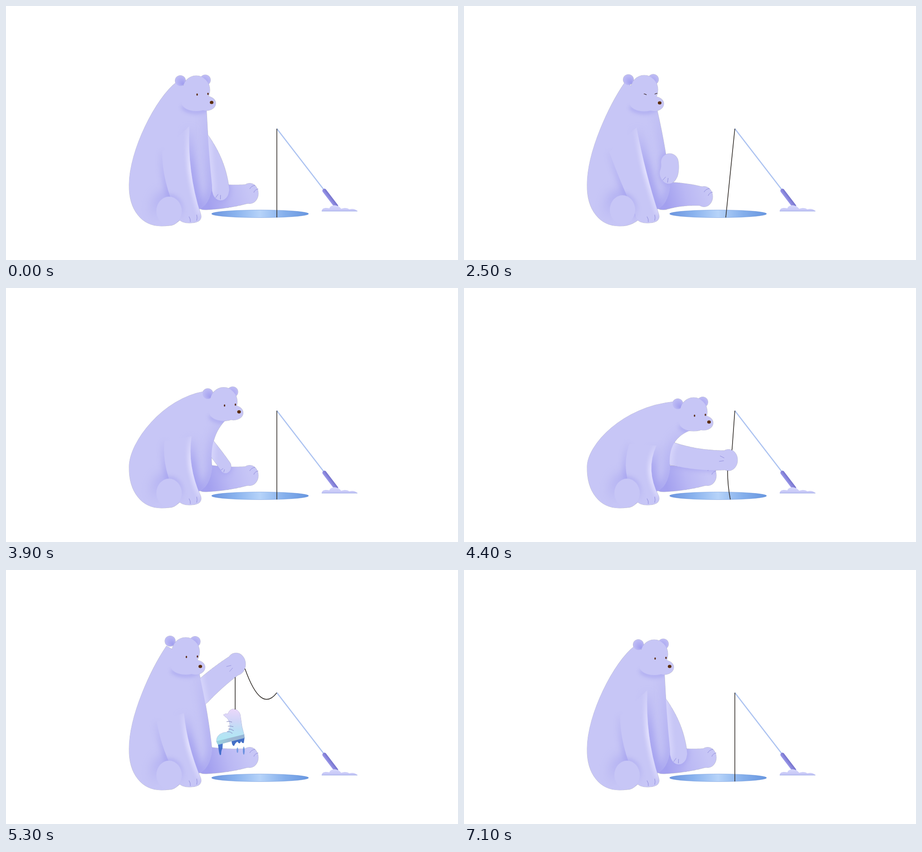
Write an HTML page with a canvas that moves like this. It is 998 by 561 pixels and loops after 7400 ms.

```html
<!DOCTYPE html>
<html lang="en">
<head>
<meta charset="utf-8">
<title>Ice fishing bear</title>
<style>
  html, body { margin: 0; width: 100%; height: 100%; overflow: hidden; background: #fff; }
  canvas { display: block; width: 998px; height: 561px; }
</style>
</head>
<body>
<canvas id="stage" width="998" height="561"></canvas>
<script>
const ctx = document.getElementById('stage').getContext('2d');
const LOOP = 7400, STEP = 100, TAU = Math.PI * 2;
const FUR = '#c7c6f6', SHADE = '#a3a0ef', CLAW = '#8f8cdc';
const shade = a => `rgba(163,160,239,${a})`;
const light = a => `rgba(229,227,255,${a})`;

// turn: profile to facing; lift: head raised; kick: far foot raised; grip: side of the hand with claws.
// shoulder: top of the near arm's inner edge; arm: start, bend, hand and the two radii of the far arm.
const sit = { nose: [454, 213], turn: 0, lift: 0.5, kick: 0, shoulder: [405, 265],
  arm: [432, 290, 470, 345, 474, 408, 14, 19], grip: 1.9 };
const startle = { nose: [432, 214], turn: 0, lift: 0.7, kick: 1, shoulder: [381, 268],
  arm: [454, 345, 456, 358, 452, 370, 19, 20], grip: 2 };
const lean = { nose: [508, 268], turn: 0, lift: 0, kick: 0, shoulder: [406, 322],
  arm: [443, 335, 455, 365, 460, 398, 10, 11], grip: 1.9 };
const reach = { nose: [541, 296], turn: 0, lift: 0, kick: 0, shoulder: [425, 348],
  arm: [446, 362, 515, 384, 584, 380, 25, 21], grip: 3.3 };
const hoist = { nose: [429, 213], turn: 0.1, lift: 1, kick: 0, shoulder: [393, 316],
  arm: [428, 274, 466, 236, 508, 208, 25, 22], grip: 2.6 };
const shrug = { nose: [394, 214], turn: 1, lift: 1, kick: 0, shoulder: [384, 298],
  arm: [428, 277, 475, 242, 520, 218, 24, 20], grip: 2.6 };

// The line sags from the rod tip to grip, loops over to drop and hangs down to end.
const TIP = [598, 271];
const slack = { grip: [598, 355], drop: [598, 405], end: [598, 467], sag: 0, loop: 0 };
const pulled = { grip: [592, 355], drop: [582, 405], end: [588, 467], sag: 0, loop: 0 };
const raised = { grip: [528, 219], drop: [506, 225], end: [506, 308], sag: 48, loop: 10 };
const draped = { grip: [526, 240], drop: [503, 245], end: [503, 320], sag: 46, loop: 39 };

const inOut = u => u * u * (3 - 2 * u);
const cubicIn = u => u ** 3;
const quadIn = u => u * u;

const POSES = [
  [0, sit], [2200, sit], [2500, startle], [2700, startle], [3200, lean, cubicIn],
  [3700, lean], [4400, reach], [4500, reach], [5200, hoist], [5500, hoist],
  [6000, shrug], [6400, shrug], [7100, sit], [LOOP, sit]
];
const LINES = [
  [0, slack], [4000, slack], [4400, pulled], [4500, pulled], [5200, raised],
  [5500, raised], [6000, draped], [6300, draped], [6700, slack, quadIn], [LOOP, slack]
];

function mix(a, b, u) {
  if (typeof a === 'number') return a + (b - a) * u;
  if (Array.isArray(a)) return a.map((v, i) => mix(v, b[i], u));
  return Object.fromEntries(Object.keys(a).map(k => [k, mix(a[k], b[k], u)]));
}

function sample(keys, t) {
  const i = keys.findIndex(k => k[0] > t);
  const [t0, a] = keys[i - 1], [t1, b, ease = inOut] = keys[i];
  return mix(a, b, ease((t - t0) / (t1 - t0)));
}

function addOval(path, x, y, rx, ry = rx) {
  path.moveTo(x + rx, y);
  path.ellipse(x, y, rx, ry, 0, 0, TAU);
  return path;
}

const oval = (...args) => addOval(new Path2D(), ...args);

// Round limb: circles along a bent path, ending in a slightly taller paw.
function limb([x0, y0, cx, cy, x1, y1, r0, r1]) {
  const path = oval(x1, y1, r1 * 0.95, r1 * 1.12);
  for (let u = 0; u <= 1; u += 1 / 48) {
    const v = 1 - u;
    addOval(path, v * v * x0 + 2 * u * v * cx + u * u * x1,
      v * v * y0 + 2 * u * v * cy + u * u * y1, mix(r0, r1, u));
  }
  return path;
}

function fill(path, style) {
  ctx.fillStyle = style;
  ctx.fill(path);
}

function stroke(path, style, width) {
  ctx.strokeStyle = style;
  ctx.lineWidth = width;
  ctx.stroke(path);
}

function ramp(x0, y0, x1, y1, ...stops) {
  const g = ctx.createLinearGradient(x0, y0, x1, y1);
  stops.forEach((c, i) => g.addColorStop(i / (stops.length - 1), c));
  return g;
}

// Blurred stroke kept inside a shape.
function soft(inside, path, style, width, blur) {
  ctx.save();
  ctx.clip(inside);
  ctx.filter = `blur(${blur}px)`;
  stroke(path, style, width);
  ctx.restore();
}

const HOLE = oval(561, 459, 107, 8.5);
const ABOVE_WATER = new Path2D();
ABOVE_WATER.rect(0, 0, 998, 459);
ABOVE_WATER.addPath(HOLE);

function drawScene() {
  fill(HOLE, ramp(454, 0, 668, 0, '#6c95df', '#8ab3ee', '#b6d3f9', '#86b0ec', '#6796e0'));
  stroke(HOLE, 'rgba(70,120,205,.55)', 0.8);
  const rod = new Path2D('M598 271L702 406');
  stroke(rod, '#93b1ec', 2.2);
  stroke(rod, '#cbd9f9', 0.9);
  ctx.lineCap = 'round';
  stroke(new Path2D('M703 408L729 442'), ramp(699, 411, 707, 405, '#9d9bec', '#7471cb'), 9);
  ctx.lineCap = 'butt';
  fill(new Path2D('M697 453C698 446 705 445 714 447C717 438 733 438 740 448C748 445 754 446 758 449C766 447 772 449 776 453Z'),
    ramp(0, 441, 0, 453, '#d6d7fb', '#c3c4f5'));
  stroke(new Path2D('M697 453H776'), '#93a3e3', 1);
}

function drawLine({ grip, drop, end, sag, loop }, tug) {
  const path = new Path2D();
  const sway = ([x, y], dx = 0, dy = 0) => [x + dx + tug * (y - TIP[1]) / 196, y + dy];
  const hang = u => sway(mix(TIP, grip, u), 0, sag);
  const over = u => sway(mix(grip, drop, u), 0, -loop);
  path.moveTo(...TIP);
  path.bezierCurveTo(...hang(1 / 3), ...hang(2 / 3), ...sway(grip));
  path.bezierCurveTo(...over(0.5), ...over(0.9), ...sway(drop));
  path.quadraticCurveTo(...sway([drop[0], (drop[1] + end[1]) / 2]), ...sway(end));
  stroke(path, '#35302c', 1.6);
}

function drawDrips(t) {
  const k = Math.max(0, Math.min(1, (6000 - t) / 600));
  if (!k) return;
  ctx.globalAlpha = 0.9;
  fill(new Path2D(`M-39 70L-27 67L-28 ${70 + 16 * k}Q-31 ${72 + 18 * k} -31 ${72 + 27 * k}Q-34 ${75 + 30 * k} -36 ${72 + 20 * k}Z`), '#3767c8');
  fill(new Path2D(`M-8 69L21 61L19 ${66 + 8 * k}Q15 ${66 + 9 * k} 13 ${66 + 4 * k}Q10 ${66 + 13 * k} 5 ${66 + 5 * k}Q0 ${66 + 8 * k} -2 ${68 + 12 * k}Q-7 ${70 + 12 * k} -8 69Z`), '#2f5fc0');
  const fall = ((t + 100) % 300) / 5;
  ctx.globalAlpha = 0.75 * k;
  fill(oval(5, 90 + fall, 1.8, 6), '#5d8fe0');
  fill(oval(19, 91 + fall, 2, 9), '#4c80d8');
  ctx.globalAlpha = 1;
}

function drawBoot([x, y], t) {
  ctx.save();
  ctx.clip(ABOVE_WATER);
  ctx.translate(x, y);
  drawDrips(t);
  const boot = new Path2D('M-26 12Q-21 8 -16 10Q-13 0 -4 -1Q7 0 11 11L15 38L20 57L-41 72Q-42 61 -34 55Q-26 50 -18 50Q-10 46 -12 32Q-14 20 -22 16Z');
  stroke(boot, 'rgba(110,110,170,.6)', 1);
  fill(boot, ramp(0, 0, 0, 68, '#ead8fa', '#d3d5f8', '#bbdff5', '#b0e8f3'));
  fill(new Path2D('M-41 70L20 55L21 63L-37 78Q-41 76 -41 70Z'), ramp(-41, 0, 21, 0, '#98d3e2', '#9fb9d3', '#94b4d6'));
  stroke(new Path2D('M-19 27Q-13 25 -7 28M-16 37Q-10 36 -4 38M-15 43Q-9 43 -3 47M-18 49Q-11 48 -6 53'), '#7f82bd', 1);
  ctx.restore();
}

function drawSplash(t) {
  if (t < 6600 || t > 7000) return;
  const u = (t - 6500) / 600;
  ctx.globalAlpha = 1 - u * 0.8;
  stroke(oval(598, 461, 15 + 34 * u, 3 + 6 * u), '#a9cbf8', 1.4);
  for (let i = 0; i < 8; i++) {
    const rise = (22 + 13 * (i % 3)) * Math.sin(Math.PI * u);
    fill(oval(598 + (i - 3.5) * (4 + 10 * u), 461 - rise, 2, 3.4), '#7eabec');
  }
  ctx.globalAlpha = 1;
}

// Torso from the hip up the curved back to the nape, then down throat and belly.
function torsoShape({ nose: [x, y], turn }) {
  const nape = [x - 77 + 23 * turn, y - 45];
  const bend = nape[0] - 272;
  const throat = [x - 5 - 0.27 * Math.max(0, x - 430) + 27 * turn, y + 16];
  const belly = [447, 320 + 0.12 * (throat[1] - 229)];
  const body = new Path2D('M455 398Q450 440 425 449L395 462Q375 486 345 486C300 487 271 450 272 395');
  body.bezierCurveTo(272, 395 - (395 - nape[1]) / 3,
    nape[0] - (0.25 + 0.0018 * bend) * bend, nape[1] + 5400 / bend - 17, ...nape);
  body.lineTo(x - 30, y - 20);
  body.lineTo(...throat);
  body.quadraticCurveTo(...belly, 455, 398);
  const rim = new Path2D('M425 449Q450 440 455 398');
  rim.quadraticCurveTo(...belly, ...throat);
  return { body, rim, top: throat[1] };
}

function nearArm([x, y]) {
  const ox = x - 60, oy = 250 + 0.27 * y;
  const outerEdge = `Q344 ${oy + 65} 379 462`, innerEdge = `Q400 ${262 + 0.4 * y} ${x} ${y}`;
  return {
    shape: new Path2D(`M${ox} ${oy}${outerEdge}C380 478 398 480 410 479C428 478 433 470 430 460${innerEdge}Z`),
    outer: new Path2D(`M${ox} ${oy}${outerEdge}`),
    inner: new Path2D(`M430 460${innerEdge}`),
    oy
  };
}

function headShape({ nose: [x, y], turn, lift }) {
  const jaw = [x - 34 + 20 * turn, y + 1, 32 + 4 * turn, 19 - 2 * lift];
  const outline = oval(x - 34 + 18 * turn, y - 22 - 10 * lift, 30 + 5 * turn, 32);
  addOval(outline, ...jaw);
  addOval(outline, x - 12 + 14 * turn, y + 2, 21, 16);
  const ears = [
    [x - 69 + 24 * turn, y - 40 - 16 * lift],
    [x - 14 + 25 * turn, y - 44 - 11 * lift]
  ];
  const eyes = [
    [x - 32 + 13 * turn, y - 14 - 7 * lift],
    [x - 8 + 17 * turn, y - 16 - 6 * lift]
  ];
  return { outline, jaw, ears, eyes };
}

function drawHead(head, nose, torso, shut) {
  const [jx, jy, jrx, jry] = head.jaw;
  const chin = new Path2D();
  chin.ellipse(jx, jy + 2, jrx, jry, 0, 0.15 * Math.PI, 0.9 * Math.PI);
  soft(torso, chin, shade(0.8), 7, 4);
  head.ears.forEach(([x, y], i) => {
    const g = ctx.createRadialGradient(x + (i ? -5 : 6), y + 7, 1, x, y, 14);
    g.addColorStop(0, SHADE);
    g.addColorStop(1, '#c3c1f6');
    fill(oval(x, y, 11.5), g);
  });
  fill(head.outline, FUR);
  head.eyes.forEach(([x, y], i) => {
    const tilt = i ? -1 : 1;
    if (shut) stroke(new Path2D(`M${x - 3} ${y - tilt}Q${x} ${y - 1} ${x + 3} ${y + tilt}`), '#3c2a2a', 1.3);
    else fill(oval(x, y, 1.6, 2.5), '#5a2b12');
  });
  fill(oval(...nose, 4, 3.6), '#5b2c06');
}

function drawClaws({ arm, grip, turn }) {
  const [x, y, , r] = arm.slice(4);
  const path = new Path2D();
  for (const a of [grip - 0.3, grip + 0.3]) {
    path.moveTo(x + r * Math.cos(a), y + r * Math.sin(a));
    path.lineTo(x + r * 0.5 * Math.cos(a), y + r * 0.5 * Math.sin(a));
  }
  ctx.globalAlpha = 1 - turn;
  stroke(path, CLAW, 1);
  ctx.globalAlpha = 1;
}

function drawBear(p, t, line) {
  const { body, rim, top } = torsoShape(p);
  const near = nearArm(p.shoulder), head = headShape(p);
  const k = p.kick;
  const leg = limb([440, 420, 490 - 8 * k, 423 - 10 * k, 538 - 8 * k, 414 + 7 * k, 30, 20]);
  const arm = limb(p.arm);
  const haunch = oval(360 - 10 * k, 453 - 3 * k, 28, 32);

  const armFront = t >= 2300 && t < 3000;
  const armBehind = t >= 3000 && t < 3900;
  const ropeOver = t >= 6000 && t < 6700;
  const paintArm = () => {
    fill(arm, FUR);
    if (!armFront) soft(arm, rim, light(0.6), 12, 6);
    drawClaws(p);
  };
  const paintLine = () => {
    if (t >= 4500 && t < 6800) drawBoot(line.end, t);
    const tug = t > 2200 && t < 2800 ? -20 * Math.sin(Math.PI * (t - 2200) / 600) : 0;
    drawLine(line, tug);
  };

  // Thin rim, later covered wherever shapes overlap.
  const ears = head.ears.map(e => oval(...e, 11.5));
  for (const part of [leg, arm, body, near.shape, haunch, ...ears, head.outline]) {
    stroke(part, 'rgba(85,85,130,.4)', 1.2);
  }

  if (armBehind) paintArm();
  fill(leg, ramp(445, 430, 535, 405, SHADE, '#bab8f4', FUR));
  ctx.save();
  ctx.translate(-8 * k, 7 * k);
  stroke(new Path2D('M538 404Q542 397 550 396M547 412Q550 405 557 404'), CLAW, 1);
  ctx.restore();
  if (!ropeOver) paintLine();
  if (!armBehind && !armFront) {
    soft(leg, arm, shade(0.5), 8, 4);
    paintArm();
  }

  fill(body, FUR);
  const innerTop = p.shoulder[1];
  const hip = ramp(0, 415, 0, 475, shade(0.65), shade(0.35), shade(0));
  soft(body, rim, ramp(0, top, 0, 420, shade(0.1), shade(0.75)), 22, 9);
  soft(body, near.inner, ramp(0, innerTop, 0, 440, shade(0), shade(0.85), SHADE), 24, 8);
  soft(body, near.outer, ramp(0, near.oy, 0, 425, shade(0.1), shade(0.8)), 13, 6);
  soft(body, haunch, hip, 26, 11);

  fill(near.shape, FUR);
  soft(near.shape, near.inner, ramp(0, innerTop, 0, 460, light(0.2), light(1), light(0.5)), 13, 4);
  soft(near.shape, haunch, hip, 10, 5);
  stroke(new Path2D('M404 465Q408 471 407 477M421 461Q423 468 421 474'), CLAW, 1);
  fill(haunch, FUR);

  if (armFront) {
    soft(body, arm, shade(0.5), 8, 5);
    paintArm();
  }
  if (ropeOver) paintLine();
  drawHead(head, p.nose, body, t >= 2300 && t < 2700);
}

function draw(t) {
  ctx.fillStyle = '#fff';
  ctx.fillRect(0, 0, 998, 561);
  drawScene();
  drawBear(sample(POSES, t), t, sample(LINES, t));
  drawSplash(t);
}

let shown = -1;
function tick() {
  const t = Math.floor((performance.now() % LOOP) / STEP) * STEP;
  if (t !== shown) draw(shown = t);
  requestAnimationFrame(tick);
}
tick();
</script>
</body>
</html>
```
